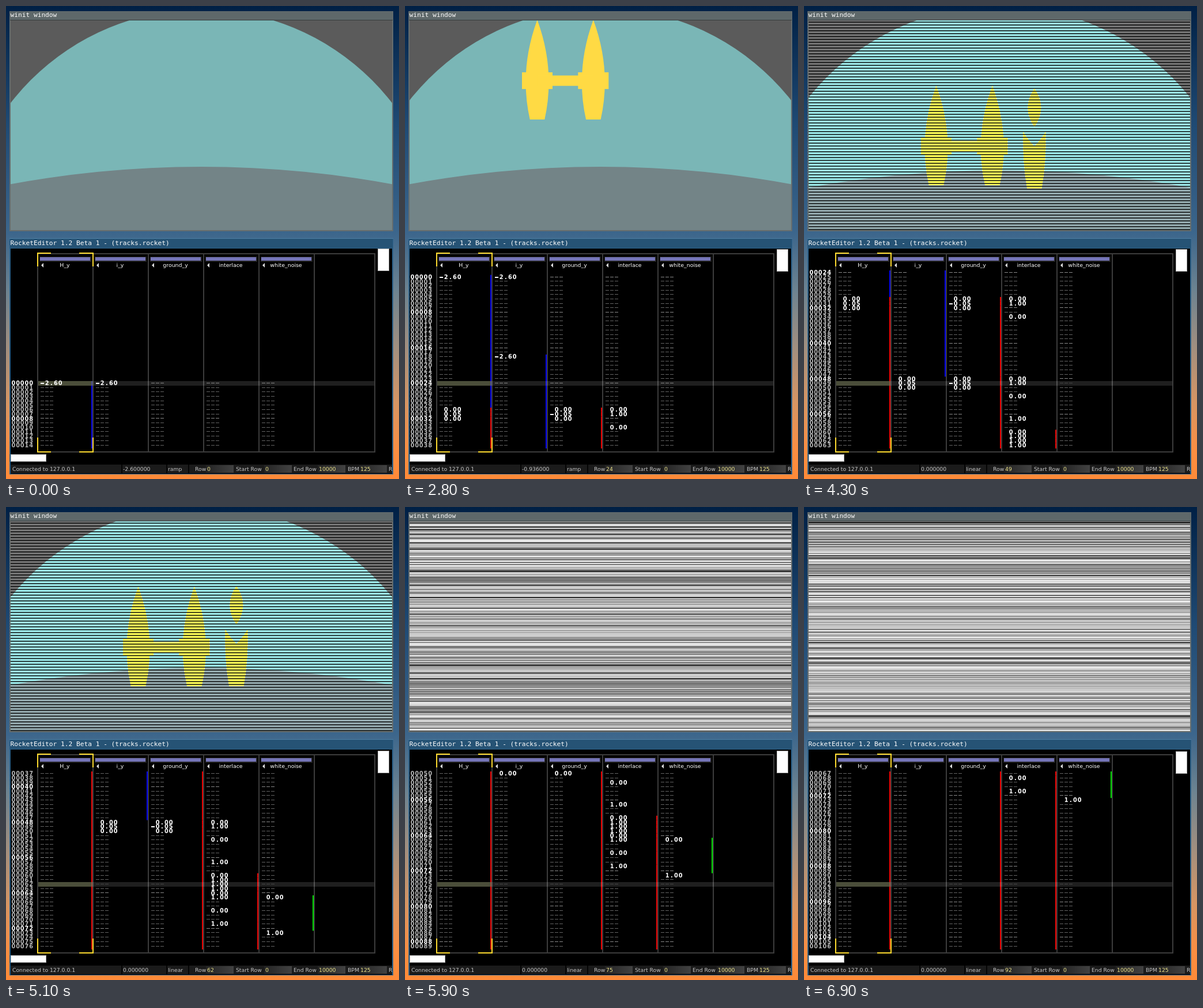
Write an HTML page with a canvas that moves like this. It is 682 px wide and 821 px high and loops after 7 s.

```html
<!DOCTYPE html>
<html lang="en">
<head>
<meta charset="utf-8">
<title>Sync tracker demo</title>
<style>
  html, body { margin: 0; width: 100%; height: 100%; overflow: hidden; background: #002048; }
  canvas { display: block; }
</style>
</head>
<body>
<canvas id="stage" width="682" height="821"></canvas>
<script>
const ctx = document.getElementById('stage').getContext('2d');
const LOOP = 7000, STEP = 100, HOLD = 1400;
const UNIT = 121.67;                                  // pixels per scene unit
const VIEW = { x: 8, y: 25, w: 662, h: 364, cx: 339 };
const ROW_H = 7.68, CUR_Y = 655, COL_X = 55, COL_W = 96;
const LINE_COLORS = { ramp: '#0000f0', linear: '#f00000', smooth: '#00e000' };

// Each key: row, value, interpolation towards the next key
const tracks = [
  { name: 'H_y', keys: [[0, -2.6, 'ramp'], [30, 0, 'linear'], [31, .05, 'linear'], [32, 0, 'linear']] },
  { name: 'i_y', keys: [[0, -2.6, 'step'], [18, -2.6, 'ramp'], [48, 0, 'step'], [49, .05, 'step'], [50, 0, 'step']] },
  { name: 'ground_y', keys: [[30, 0, 'linear'], [31, -.05, 'linear'], [32, 0, 'linear'],
    [48, 0, 'linear'], [49, -.05, 'linear'], [50, 0, 'linear']] },
  { name: 'interlace', keys: [[30, 0, 'step'], [31, 1, 'step'], [34, 0, 'step'], [48, 0, 'step'],
    [49, 1, 'step'], [52, 0, 'step'], [57, 1, 'step'], [60, 0, 'linear'], [61, 1, 'linear'],
    [62, 1, 'linear'], [63, 1, 'linear'], [64, 0, 'linear'], [65, 1, 'linear'],
    [68, 0, 'linear'], [71, 1, 'linear']] },
  { name: 'white_noise', keys: [[65, 0, 'smooth'], [73, 1, 'step']] }
];
const easing = { step: () => 0, linear: p => p, ramp: p => p * p, smooth: p => p * p * (3 - 2 * p) };

function sample({ keys }, row) {
  const i = keys.findLastIndex(k => k[0] <= row);
  if (i < 0) return keys[0][1];
  const [r0, v0, mode] = keys[i], next = keys[i + 1];
  return next ? v0 + (next[1] - v0) * easing[mode]((row - r0) / (next[0] - r0)) : v0;
}

function random(seed) {
  return () => {
    seed = (seed + 0x6D2B79F5) | 0;
    let n = Math.imul(seed ^ (seed >>> 15), 1 | seed);
    n = (n + Math.imul(n ^ (n >>> 7), 61 | n)) ^ n;
    return ((n ^ (n >>> 14)) >>> 0) / 4294967296;
  };
}

function rect(color, x, y, w, h) {
  ctx.fillStyle = color;
  ctx.fillRect(x, y, w, h);
}

function gradient(stops, x0, y0, x1, y1) {
  const g = ctx.createLinearGradient(x0, y0, x1, y1);
  stops.forEach(([p, c]) => g.addColorStop(p, c));
  return g;
}

function text(str, x, y, color, font, align = 'left') {
  ctx.font = font;
  ctx.fillStyle = color;
  ctx.textAlign = align;
  ctx.fillText(str, x, y);
}

function disc(color, y, r) {
  ctx.fillStyle = color;
  ctx.beginPath();
  ctx.arc(VIEW.cx, y, r, 0, Math.PI * 2);
  ctx.fill();
}

function fillShape(x, y, build) {
  ctx.save();
  ctx.translate(x, y);
  ctx.beginPath();
  build();
  ctx.fill();
  ctx.restore();
}

function lobe(x, y) {
  fillShape(x, y, () => {
    ctx.moveTo(0, 138);
    ctx.quadraticCurveTo(32, 224.5, 12.75, 311);
    ctx.lineTo(-12.75, 311);
    ctx.quadraticCurveTo(-32, 224.5, 0, 138);
  });
}

function letterH(y) {
  const left = VIEW.cx - .9 * UNIT, right = VIEW.cx - .1 * UNIT;
  for (const x of [left, right]) {
    lobe(x, y);
    ctx.fillRect(x - 26.5, y + 229, 53, 29);
  }
  ctx.fillRect(left, y + 234.5, right - left, 18);
}

function letterI(y) {
  fillShape(VIEW.cx + .5 * UNIT, y, () => {
    ctx.moveTo(0, 137);
    ctx.quadraticCurveTo(23, 170.5, 0, 204);
    ctx.quadraticCurveTo(-23, 170.5, 0, 137);
    ctx.moveTo(-19.5, 212);
    ctx.quadraticCurveTo(-11.5, 226, 0, 237.5);
    ctx.quadraticCurveTo(11.5, 226, 19.5, 212);
    ctx.quadraticCurveTo(21, 262, 12.75, 310.5);
    ctx.lineTo(-12.75, 310.5);
    ctx.quadraticCurveTo(-21, 262, -19.5, 212);
  });
}

function scanlines(amount) {
  ctx.save();
  ctx.globalAlpha = amount;
  ctx.globalCompositeOperation = 'color-dodge';
  rect('#3b3b3b', VIEW.x, VIEW.y, VIEW.w, VIEW.h);
  ctx.globalCompositeOperation = 'source-over';
  for (let y = 2; y < VIEW.h; y += 5) rect('rgba(0,0,0,.72)', VIEW.x, VIEW.y + y, VIEW.w, 2);
  ctx.restore();
}

function noise(amount, seed) {
  const rnd = random(seed);
  ctx.save();
  ctx.globalAlpha = amount;
  for (let y = 0; y < VIEW.h; y++) {
    const v = Math.round(255 * Math.pow(rnd(), .55));
    rect(`rgb(${v},${v},${v})`, VIEW.x, VIEW.y + y, VIEW.w, 1);
  }
  ctx.restore();
}

function drawScene(row) {
  const [hY, iY, groundY, interlace, whiteNoise] = tracks.map(t => sample(t, row));
  ctx.save();
  ctx.beginPath();
  ctx.rect(VIEW.x, VIEW.y, VIEW.w, VIEW.h);
  ctx.clip();
  rect('#5b5b5b', VIEW.x, VIEW.y, VIEW.w, VIEW.h);
  disc('#7ab6b6', 424.5, 418.6 + row * .1217);
  disc('#738487', 279 + 15 * UNIT - groundY * UNIT, 15 * UNIT);
  ctx.fillStyle = '#ffda44';
  letterH(hY * UNIT);
  letterI(iY * UNIT);
  if (interlace > 0) scanlines(interlace);
  if (whiteNoise > 0) noise(whiteNoise, row * 977 + 5);
  ctx.restore();
}

function drawDesktop() {
  rect(gradient([[0, '#002045'], [.25, '#1f4a74'], [.48, '#3c668c'], [.6, '#6c8391'],
    [.72, '#a08f80'], [.84, '#d69563'], [.94, '#fb8e42'], [1, '#ff8a38']], 0, 0, 0, 821), 0, 0, 682, 821);
  const titleFont = '11.2px "DejaVu Sans Mono", monospace';
  rect('#666d6e', 6, 9, 666, 382);
  rect('#5e686a', 7, 10, 664, 14);
  rect('#363c3d', 7, 24, 664, 1);
  text('winit window', 7.5, 19, '#fff', titleFont);
  rect('#2a5f88', 6, 403, 666, 410);
  rect('#4d7fa3', 6, 403, 666, 1);
  rect('#265375', 7, 404, 664, 16);
  text('RocketEditor 1.2 Beta 1 - (tracks.rocket)', 7.5, 415, '#fff', titleFont);
  rect('#000', 8, 421, 662, 391);
}

// Places characters on a fixed-width grid
function cells(str, x, y, color, dashHeight = 2) {
  [...str].forEach((ch, i) => {
    const cx = x + (i + .5) * 7.7;
    if (ch === '-') rect(color, Math.round(cx - 3), Math.round(y) - 1, 6, dashHeight);
    else text(ch, cx, y + 3.2, color, 'bold 9.8px "DejaVu Sans", sans-serif', 'center');
  });
}

function drawHeaders() {
  for (let i = 0; i <= 5; i++) rect('#3c3c3c', COL_X + i * COL_W - 1, 429, 2, 346);
  rect('#3c3c3c', 639, 429, 2, 346);
  rect('#3c3c3c', 54, 429, 587, 2);
  rect('#3c3c3c', 54, 773, 587, 2);
  tracks.forEach(({ name }, i) => {
    const x = COL_X + i * COL_W;
    rect('#222', x + 3, 435, 90, 9);
    rect('#7575b8', x + 4, 436, 87, 6);
    ctx.fillStyle = '#ddd';
    ctx.beginPath();
    ctx.moveTo(x + 6, 450);
    ctx.lineTo(x + 10, 446);
    ctx.lineTo(x + 10, 454);
    ctx.fill();
    text(name, x + 47, 453, '#fff', '9.4px "DejaVu Sans", sans-serif', 'center');
  });
  ctx.strokeStyle = '#ffdc30';
  ctx.lineWidth = 2;
  ctx.beginPath();
  for (const [x, dx] of [[55, 23], [151, -24]]) {
    ctx.moveTo(x, 452);
    ctx.lineTo(x, 429);
    ctx.lineTo(x + dx, 429);
    ctx.moveTo(x, 749);
    ctx.lineTo(x, 774);
    ctx.lineTo(x + dx, 774);
  }
  ctx.stroke();
}

function drawRows(row) {
  const first = Math.max(0, row - 25), last = row + 14;
  const rowY = r => CUR_Y + (r - row) * ROW_H;
  const topEdge = rowY(first) - 4, bottomEdge = 768;

  tracks.forEach(({ keys }, i) => keys.forEach(([r, , mode], k) => {
    if (!LINE_COLORS[mode]) return;
    const y0 = Math.max(topEdge, rowY(r) - 4);
    const y1 = Math.min(bottomEdge, keys[k + 1] ? rowY(keys[k + 1][0]) - 4 : bottomEdge);
    if (y1 > y0) rect(LINE_COLORS[mode], COL_X + i * COL_W + 93, y0, 2, y1 - y0);
  }));
  rect('rgba(255,255,255,.12)', 56, 651, 583, 8);
  rect('rgba(105,110,78,.6)', 56, 651, 94, 8);

  for (let r = first; r <= last; r++) {
    const y = rowY(r), strong = r % 8 === 0;
    const dashColor = strong ? '#8a8a8a' : r === row ? '#484848' : '#636363';
    cells(String(r).padStart(5, '0'), 9, y, strong ? '#fff' : '#b4b4b4');
    tracks.forEach(({ keys }, i) => {
      const x = COL_X + 4.5 + i * COL_W, key = keys.find(k => k[0] === r);
      if (key) cells(key[1].toFixed(2).padStart(5), x, y, '#fff');
      else if (r !== row || i > 0) cells('---', x, y, dashColor, 1);
    });
  }
}

function drawStatus(row) {
  const font = '9.25px "DejaVu Sans", sans-serif';
  const label = (str, x, color = '#c8c8c8') => text(str, x, 807, color, font);
  rect('#1b1b1b', 8, 796, 662, 15);
  for (const x of [200, 278, 316]) rect('#050505', x, 796, 2, 15);

  const mode = tracks[0].keys.findLast(k => k[0] <= row)[2];
  label('Connected to 127.0.0.1', 11);
  label(sample(tracks[0], row).toFixed(6), 203);
  label(mode, 281);
  for (const [name, x, value, fx] of [['Row', 328, row, 347], ['Start Row', 399, 0, 448],
    ['End Row', 499, 10000, 541], ['BPM', 593, 125, 613]]) {
    rect(gradient([[0, '#242424'], [1, '#424242']], fx, 0, fx + 48, 0), fx, 797, 48, 13);
    label(name, x);
    label(value, fx + 2, '#f0e68c');
  }
  ctx.save();
  ctx.beginPath();
  ctx.rect(8, 796, 662, 16);
  ctx.clip();
  label('R', 664);
  ctx.restore();
}

function scrollThumb(x, y, w, h) {
  rect('#aaa', x, y, w, h);
  rect('#fff', x + 1, y + 1, w - 2, h - 2);
}

function drawEditor(row) {
  drawHeaders();
  drawRows(row);
  scrollThumb(645, Math.round(420.7 + row * .035), 20, 39);
  scrollThumb(8, 778, 62, 13);
  drawStatus(row);
}

function rowAt(time) {
  const steps = Math.floor((time - HOLD) / STEP);
  return steps < 0 ? 0 : Math.floor(1.2 + 1.655 * steps);
}

const start = performance.now();
let shown = -1;
function frame() {
  const row = rowAt((performance.now() - start) % LOOP);
  if (row !== shown) {
    shown = row;
    drawDesktop();
    drawScene(row);
    drawEditor(row);
  }
  requestAnimationFrame(frame);
}
frame();
</script>
</body>
</html>
```
